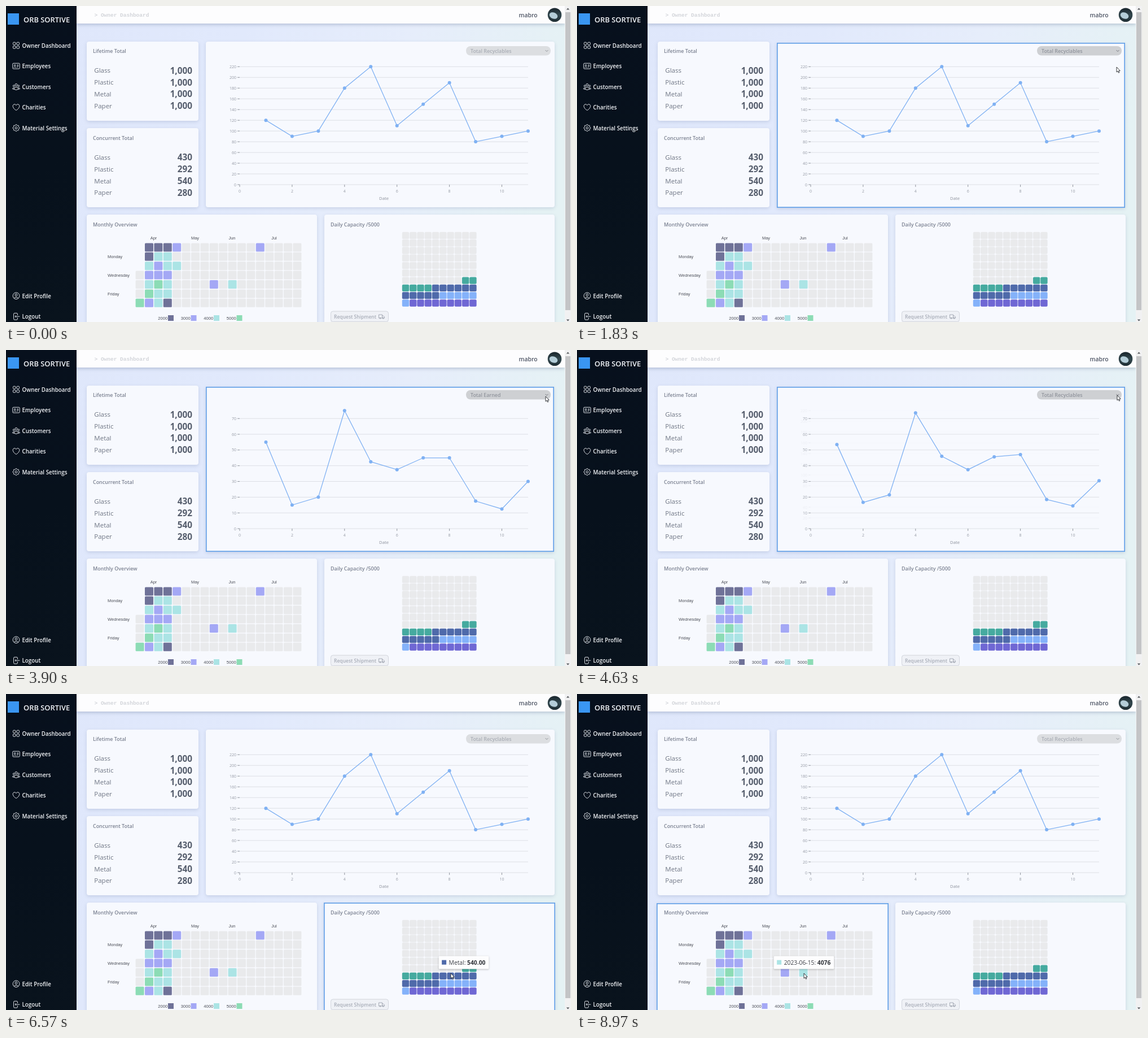
An HTML page with a canvas that plays this animation: 1001 px wide and 559 px high, repeating every 9010 ms.

```html
<!DOCTYPE html>
<html lang="en">
<head>
<meta charset="utf-8">
<title>Dashboard</title>
<style>
html, body { margin: 0; width: 100%; height: 100%; overflow: hidden; background: #e0e8fb; }
canvas { display: block; width: 1001px; height: 559px; }
</style>
</head>
<body>
<canvas id="stage"></canvas>
<script>
const W = 1001, H = 559, LOOP = 9010;
const canvas = document.getElementById('stage');
const ctx = canvas.getContext('2d');
const dpr = window.devicePixelRatio || 1;
canvas.width = W * dpr;
canvas.height = H * dpr;

const SANS = '"Open Sans", "Noto Sans", sans-serif';
const ARIAL = '"Liberation Sans", Arial, sans-serif';
const MONO = '"Liberation Mono", monospace';
const BLUE = '#7fb1f3', VIOLET = '#8583e6', BORDER = '#66a2e8';

const recycled = [120, 90, 100, 180, 220, 110, 150, 190, 80, 90, 100];
const earned = [55, 15, 20, 75, 42.5, 37.5, 45, 45, 17.5, 12.5, 30];

// Chart modes: 0 recyclables, 1 both series, 2 earned
const modes = [[0, 0], [2420, 1], [3450, 2], [4560, 0]];
const modeNames = ['Total Recyclables', 'Recyclables vs Cust Earnings', 'Total Earned'];

// Pointer path: time, x, y
const path = [
  [900, 1001, 240], [1500, 956, 150], [1830, 956, 108], [2200, 957, 79],
  [2630, 957, 79], [3900, 956, 82], [4700, 957, 80], [5430, 831, 341],
  [6250, 792, 462], [6570, 788, 494], [7300, 765, 510], [8400, 368, 494],
  [8650, 370, 494], [8900, 402, 494], [LOOP, 402, 494]
];

const cards = [
  { box: [143, 63, 198, 140] },
  { box: [143, 216, 198, 140] },
  { box: [354, 63, 618, 293], hover: [354, 65, 617, 292] },
  { box: [143, 369, 408, 210], hover: [141, 370, 411, 210] },
  { box: [564, 369, 408, 210], hover: [563, 369, 410, 210] }
];

const materials = [
  ['Glass', 430, '#6f67d4'], ['Plastic', 292, '#84b2fa'],
  ['Metal', 540, '#4f6aaa'], ['Paper', 280, '#45aa9f']
];
const waffle = { x: 701.8, y: 399.8, step: 13.27, size: 12.4 };
const waffleCells = materials.flatMap(m => Array(Math.round(m[1] / 50)).fill(m));

const dayColors = { D: '#6f7298', V: '#a4a8f5', T: '#abe4e5', G: '#8cdcb5', '.': '#e9eaec' };
const dayBase = { D: 2000, V: 3000, T: 4000, G: 5000 };
const weeks = {
  0: '   ...G', 1: 'DDTVTGV', 2: 'DTVVGTT', 3: 'DTTVTTD', 4: 'V.T....',
  8: '....V..', 10: '....T..', 13: 'V......'
};
const cal = { x: 229.6, y: 419.4, step: 16.4, size: 15 };
const day = (col, row) => (weeks[col] || '.......')[row];

const clamp = v => Math.max(0, Math.min(1, v));
const ease = v => v * v * (3 - 2 * v);
const lerp = (a, b, k) => a + (b - a) * k;
const inside = (p, [x, y, w, h]) => p && p.x >= x && p.x < x + w && p.y >= y && p.y < y + h;

function text(str, x, y, size, color, { weight = 400, align = 'left', family = SANS } = {}) {
  ctx.font = `${weight} ${size}px ${family}`;
  ctx.textAlign = align;
  ctx.fillStyle = color;
  ctx.fillText(str, x, y);
}

function rect(x, y, w, h, color, r = 0) {
  ctx.fillStyle = color;
  ctx.beginPath();
  ctx.roundRect(x, y, w, h, r);
  ctx.fill();
}

function line(x1, y1, x2, y2, color, width = 1) {
  ctx.strokeStyle = color;
  ctx.lineWidth = width;
  ctx.beginPath();
  ctx.moveTo(x1, y1);
  ctx.lineTo(x2, y2);
  ctx.stroke();
}

function shadow(color, blur, y) {
  ctx.shadowColor = color;
  ctx.shadowBlur = blur * dpr;
  ctx.shadowOffsetY = y * dpr;
}

function gradient(x1, y1, x2, y2, colors) {
  const g = ctx.createLinearGradient(x1, y1, x2, y2);
  colors.forEach((c, i) => g.addColorStop(i / (colors.length - 1), c));
  return g;
}

function pointer(t) {
  const i = path.findIndex(k => k[0] > t);
  if (i < 1) return null;
  const [a, b] = [path[i - 1], path[i]];
  const k = ease((t - a[0]) / (b[0] - a[0]));
  return { x: lerp(a[1], b[1], k), y: lerp(a[2], b[2], k) };
}

// Icons live on a 24 unit grid
function gearPath() {
  const pts = [];
  for (let i = 0; i < 32; i++) {
    const r = i % 4 < 2 ? 9.2 : 7.3;
    const a = (i - 0.5) * Math.PI / 16;
    pts.push(`${12 + r * Math.cos(a)} ${12 + r * Math.sin(a)}`);
  }
  return `M${pts.join('L')}Z` + ring(12, 12, 3);
}
function ring(x, y, r) {
  return `M${x - r} ${y}a${r} ${r} 0 1 1 ${2 * r} 0a${r} ${r} 0 1 1 ${-2 * r} 0`;
}
const tile = (x, y) => `M${x + 2} ${y}h3q2 0 2 2v3q0 2-2 2h-3q-2 0-2-2v-3q0-2 2-2z`;

const icons = {
  tiles: tile(3.5, 3.5) + tile(13.5, 3.5) + tile(3.5, 13.5) + tile(13.5, 13.5),
  badge: 'M4.5 4.5h15q2 0 2 2v11q0 2-2 2h-15q-2 0-2-2v-11q0-2 2-2zM14 9h4.5M14 12h4.5M14 15h3M5 16q3.5-4 7 0' + ring(8.5, 10, 1.8),
  people: ring(12, 7, 3) + ring(5.5, 10, 2.2) + ring(18.5, 10, 2.2) + 'M6 19q0-6 6-6t6 6q-6 3.5-12 0M6.5 15q-4-.5-4.7 3 2 1 4 .8M17.5 15q4-.5 4.7 3-2 1-4 .8',
  heart: 'M21 8.25c0-2.5-2.1-4.5-4.7-4.5-1.9 0-3.6 1.1-4.3 2.7-.7-1.6-2.4-2.7-4.3-2.7C5.1 3.75 3 5.8 3 8.25c0 7.2 9 12 9 12s9-4.8 9-12z',
  gear: gearPath(),
  user: ring(12, 12, 9) + ring(12, 9.7, 3) + 'M6 18.7q6-6 12 0',
  exit: 'M15.75 9V5.25q0-2.25-2.25-2.25h-6q-2.25 0-2.25 2.25v13.5q0 2.25 2.25 2.25h6q2.25 0 2.25-2.25V15M12 9l-3 3l3 3M9 12h12.75',
  truck: 'M2 5h12v12h-12zM14 9h4l4 4v4h-8' + ring(7, 17.5, 2) + ring(17.5, 17.5, 2)
};

function icon(name, cx, cy, scale, color) {
  ctx.save();
  ctx.translate(cx - 12 * scale, cy - 12 * scale);
  ctx.scale(scale, scale);
  ctx.strokeStyle = color;
  ctx.lineWidth = 1.5;
  ctx.stroke(new Path2D(icons[name]));
  ctx.restore();
}

const menu = [
  ['tiles', 'Owner Dashboard', 70], ['badge', 'Employees', 106.5], ['people', 'Customers', 143],
  ['heart', 'Charities', 179.5], ['gear', 'Material Settings', 216],
  ['user', 'Edit Profile', 513], ['exit', 'Logout', 549.5]
];

function drawSidebar() {
  rect(0, 0, 125, H, gradient(0, 0, 125, H, ['#07101d', '#07111c', '#09131d']));
  rect(3, 13, 20, 20, '#3a96f2');
  text('ORB SORTIVE', 31, 29, 12.9, '#f4f6fa', { weight: 600 });
  for (const [name, label, y] of menu) {
    icon(name, 18, y - 0.3, 0.65, '#e4e7ec');
    text(label, 28.5, y + 3.6, 9.8, '#f2f4f7', { weight: 600 });
  }
}

function drawHeader() {
  ctx.save();
  shadow('rgba(90,105,140,.35)', 6, 2);
  rect(125, 0, 865, 31, '#fdfdfe');
  ctx.restore();
  text('> Owner Dashboard', 156.5, 19, 9.5, '#d3d5da', { weight: 700, family: MONO });
  text('mabro', 925, 20, 10.4, '#4f5665', { weight: 600, align: 'center' });
  ctx.save();
  ctx.beginPath();
  ctx.arc(972, 15.7, 12.3, 0, 7);
  ctx.clip();
  rect(959, 3, 26, 26, gradient(0, 3, 0, 29, ['#18242b', '#33484f', '#1c2a30']));
  ctx.fillStyle = '#b4cdd8';
  ctx.beginPath();
  ctx.ellipse(970, 17, 7.5, 5.5, 0.4, 0, 7);
  ctx.fill();
  ctx.restore();
}

function drawScrollbar() {
  rect(990, 0, 11, H, '#f1f1f2');
  rect(991, 11, 9, 527, '#c3c4c6');
  ctx.fillStyle = '#55585c';
  for (const [y, d] of [[6.5, -3], [554.5, 3]]) {
    ctx.beginPath();
    ctx.moveTo(992.8, y);
    ctx.lineTo(998.2, y);
    ctx.lineTo(995.5, y + d);
    ctx.fill();
  }
}

function drawCard({ box, hover }, p) {
  const on = hover && inside(p, box);
  const [x, y, w, h] = on ? hover : box;
  ctx.save();
  shadow('rgba(100,116,160,.24)', 6, 2);
  rect(x, y, w, h, '#f7f9fe', on ? 1 : 4);
  ctx.restore();
  if (on) {
    ctx.strokeStyle = BORDER;
    ctx.lineWidth = 1.7;
    ctx.strokeRect(x + 0.85, y + 0.85, w - 1.7, h - 1.7);
  }
}

const title = (str, x, y) => text(str, x, y, 8.95, '#7a8090', { weight: 600 });

function drawTotals(name, top, values) {
  title(name, 154, top + 20);
  materials.forEach(([label], i) => {
    const y = top + 51 + i * 20.9;
    text(label, 156.3, y + 4.2, 11.5, '#6e7583');
    text(values[i], 330, y + 5.6, 15.3, '#565e6d', { weight: 700, align: 'right' });
  });
}

const chartX = v => 414 + v * 46.45;
const chartY = k => 316 - k * 208.7;

function drawAxis(max, step, alpha) {
  if (alpha <= 0) return;
  ctx.globalAlpha = alpha;
  for (let v = 0; v <= max; v += step) {
    const y = chartY(v / max);
    line(414, y, 925, y, '#dddfe5');
    line(410, y, 414, y, '#8f949d');
    text(v, 408, y + 2.6, 7, '#959aa4', { align: 'right' });
  }
  ctx.globalAlpha = 1;
}

function drawSeries(values, color) {
  ctx.strokeStyle = ctx.fillStyle = color;
  ctx.lineWidth = 1.3;
  ctx.beginPath();
  values.forEach((v, i) => ctx.lineTo(chartX(i + 1), chartY(v)));
  ctx.stroke();
  values.forEach((v, i) => {
    ctx.beginPath();
    ctx.arc(chartX(i + 1), chartY(v), 3, 0, 7);
    ctx.fill();
  });
}

function drawSelect(label, dark) {
  const g = Math.round(lerp(220, 206, dark));
  const c = Math.round(lerp(170, 144, dark));
  rect(815, 71, 150, 16.5, `rgb(${g},${g + 2},${g + 5})`, 8);
  text(label, 823, 82.7, 8.9, `rgb(${c},${c + 4},${c + 12})`, { weight: 600 });
  ctx.strokeStyle = `rgb(${c - 25},${c - 22},${c - 16})`;
  ctx.lineWidth = 1;
  ctx.beginPath();
  ctx.moveTo(955.5, 78);
  ctx.lineTo(958, 80.5);
  ctx.lineTo(960.5, 78);
  ctx.stroke();
}

function drawChart(t) {
  let i = modes.length - 1;
  while (modes[i][0] > t) i--;
  const [start, mode] = modes[i];
  const prev = i ? modes[i - 1][1] : mode;
  const k = ease(clamp((t - start) / 350));
  const small = lerp(+(prev === 2), +(mode === 2), k);

  drawAxis(220, 20, 1 - small);
  drawAxis(75, 10, small);
  for (let v = 0; v <= 10; v += 2) {
    line(chartX(v), 316, chartX(v), 320, '#8f949d');
    text(v, chartX(v), 330, 7, '#959aa4', { align: 'center' });
  }
  text('Date', 669.5, 342.5, 7.7, '#8b909a', { align: 'center' });
  if (mode === 1) drawSeries(earned.map(v => v / 220), VIOLET);
  drawSeries(recycled.map((v, n) => lerp(v / 220, earned[n] / 75, small)), BLUE);

  const dark = clamp((t - 1550) / 200) * clamp((4950 - t) / 250);
  drawSelect(modeNames[mode], dark);
}

function drawCalendar() {
  title('Monthly Overview', 154, 390);
  const label = { family: ARIAL };
  [['Apr', 261.5], ['May', 335], ['Jun', 400.5], ['Jul', 475]].forEach(([m, x]) =>
    text(m, x, 412.5, 7.4, '#4c4f57', { family: ARIAL, align: 'center' }));
  ['Monday', 'Wednesday', 'Friday'].forEach((d, i) => text(d, 180, 446 + i * 32.8, 7.4, '#4c4f57', label));
  for (let col = 0; col < 18; col++) {
    for (let row = 0; row < 7; row++) {
      const color = dayColors[day(col, row)];
      if (color) rect(cal.x + col * cal.step, cal.y + row * cal.step, cal.size, cal.size, color, 1.5);
    }
  }
  ['D', 'V', 'T', 'G'].forEach((key, i) => {
    const x = 269.3 + i * 40.5;
    text(dayBase[key], x, 555, 7.6, '#4c4f57', label);
    rect(x + 17.7, 547, 10, 10, dayColors[key]);
  });
}

function drawWaffle() {
  title('Daily Capacity /5000', 575, 390);
  for (let i = 0; i < 100; i++) {
    const x = waffle.x + (9 - i % 10) * waffle.step;
    const y = waffle.y + (9 - Math.floor(i / 10)) * waffle.step;
    const cell = waffleCells[i];
    rect(x, y, waffle.size, waffle.size, cell ? cell[2] : '#e9eaec', 2);
  }
  rect(575, 539.5, 102.5, 24, '#eff1f6', 4);
  ctx.strokeStyle = '#d3d6dd';
  ctx.lineWidth = 1;
  ctx.beginPath();
  ctx.roundRect(575.5, 540, 102, 18.5, 4);
  ctx.stroke();
  text('Request Shipment', 581, 552.6, 8.5, '#a8adb8', { weight: 600 });
  icon('truck', 665.5, 549.5, 0.5, '#8f95a1');
}

function cellAt(p, grid) {
  const col = Math.floor((p.x - grid.x) / grid.step);
  const row = Math.floor((p.y - grid.y) / grid.step);
  return [col, row];
}

function tooltipAt(p) {
  let [col, row] = cellAt(p, waffle);
  if (col >= 0 && col < 10 && row >= 0 && row < 10) {
    const cell = waffleCells[(9 - row) * 10 + 9 - col];
    return cell && { label: `${cell[0]}: `, value: cell[1].toFixed(2), color: cell[2], dx: 23 };
  }
  [col, row] = cellAt(p, cal);
  const key = col >= 0 && col < 18 && row >= 0 && row < 7 ? day(col, row) : '.';
  if (!dayBase[key]) return null;
  const date = new Date(Date.UTC(2023, 3, 2 + col * 7 + row)).toISOString().slice(0, 10);
  return { label: `${date}: `, value: String(dayBase[key] + 76), color: dayColors[key], dx: 0 };
}

function drawTooltip(p) {
  const tip = tooltipAt(p);
  if (!tip) return;
  const size = 10.3;
  ctx.font = `400 ${size}px ${SANS}`;
  const labelW = ctx.measureText(tip.label).width;
  ctx.font = `700 ${size}px ${SANS}`;
  const w = labelW + ctx.measureText(tip.value).width + 24;
  const x = p.x + tip.dx - w / 2, y = p.y - 30.5;
  ctx.save();
  shadow('rgba(0,0,0,.25)', 3, 1);
  rect(x, y, w, 23, '#fdfdfe', 1.5);
  ctx.restore();
  rect(x + 5.5, y + 7.2, 8, 8, tip.color);
  text(tip.label, x + 18, y + 15.3, size, '#3b3e45');
  text(tip.value, x + 18 + labelW, y + 15.3, size, '#2f3238', { weight: 700 });
}

function drawPointer(p) {
  ctx.save();
  ctx.translate(p.x, p.y);
  const arrow = new Path2D('M0 0V9L2.1 7.2L3.5 10.2L4.9 9.6L3.6 6.8L6.2 6.5Z');
  ctx.fillStyle = '#fff';
  ctx.fill(arrow);
  ctx.strokeStyle = '#22252a';
  ctx.lineWidth = 0.9;
  ctx.stroke(arrow);
  ctx.restore();
}

function draw(t) {
  const p = pointer(t);
  ctx.setTransform(dpr, 0, 0, dpr, 0, 0);
  rect(0, 0, W, H, gradient(125, 0, 990, 200, ['#dfe7fb', '#e1e9fc', '#e6edfb', '#e5f2f4']));
  drawHeader();
  cards.forEach(card => drawCard(card, p));
  drawTotals('Lifetime Total', 63, Array(4).fill('1,000'));
  drawTotals('Concurrent Total', 216.5, materials.map(m => m[1]));
  drawChart(t);
  drawCalendar();
  drawWaffle();
  drawSidebar();
  drawScrollbar();
  if (p) {
    drawTooltip(p);
    drawPointer(p);
  }
}

const begin = performance.now();
function tick() {
  draw((performance.now() - begin) % LOOP);
  requestAnimationFrame(tick);
}
tick();
</script>
</body>
</html>
```
